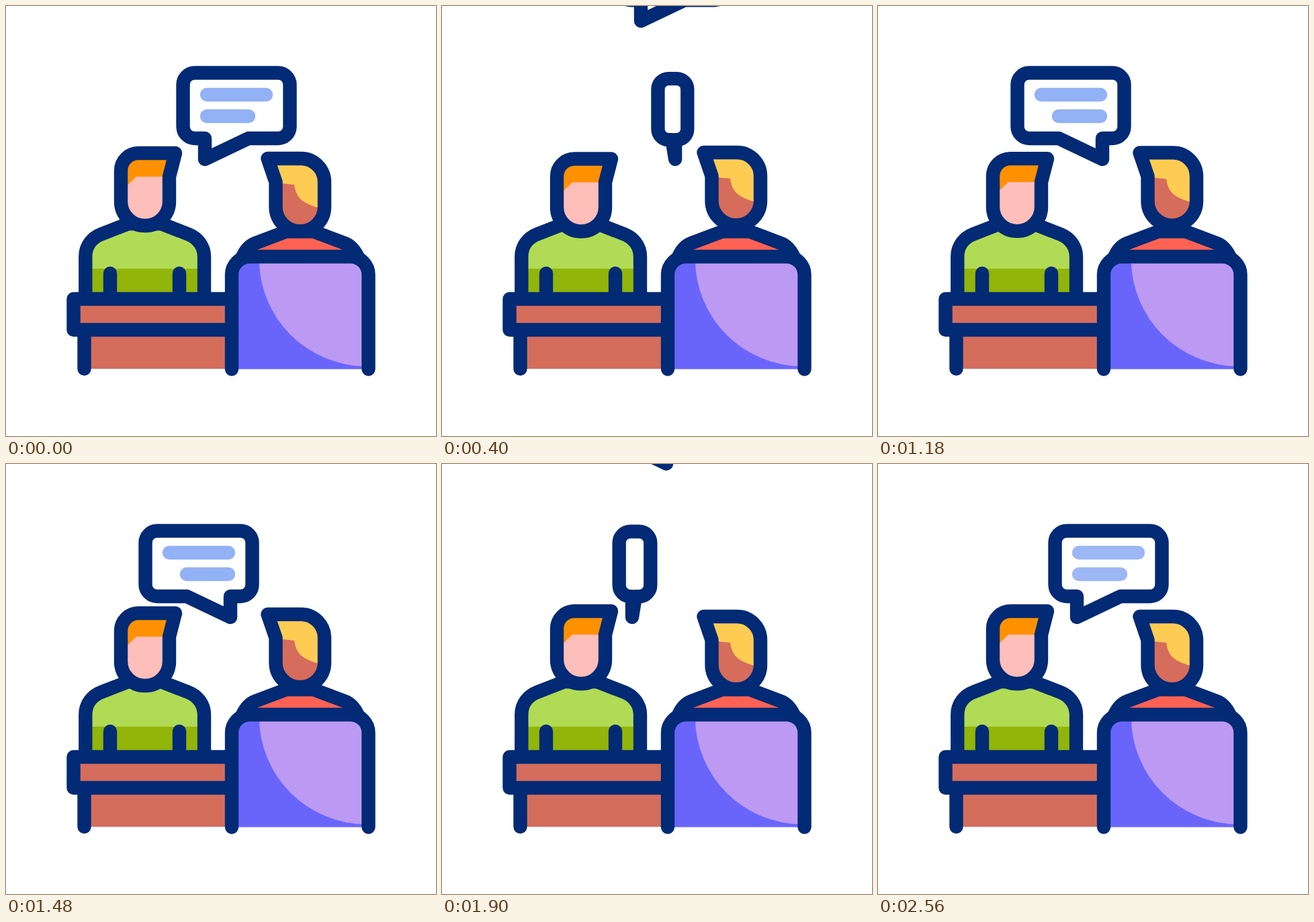
Recreate the animation shown at these times as an HTML page. Size 640 by 640 pixels, loop 3 s.

```html
<!DOCTYPE html>
<html lang="en">
<head>
<meta charset="utf-8">
<title>Interview</title>
<style>
  html, body { margin: 0; width: 100%; height: 100%; overflow: hidden; background: #fff; }
  svg { display: block; width: 100vw; height: 100vh; }
  .line { fill: none; stroke: #022a75; stroke-width: 20.4; stroke-linecap: round; stroke-linejoin: round; }
  .bar { fill: none; stroke: #93b1f5; stroke-width: 20.4; stroke-linecap: round; }
</style>
</head>
<body>
<svg viewBox="0 0 640 640">
  <defs>
    <path id="torsoL" d="M118.300 436V373C118.300 357 128 345 142 339.500L182 324H231L271 339.500C285 345 295 357 295 373V436"/>
    <path id="faceL" d="M252 219L243 254V291A36 36 0 0 1 171 291V245A26 26 0 0 1 197 219Z"/>
    <path id="faceR" d="M389.500 227H439A35 35 0 0 1 474 262V299A36.250 36.250 0 0 1 401.500 299V262Z"/>
    <path id="chair" d="M336 540.500V400A27 27 0 0 1 363 373H512.500A27 27 0 0 1 539.500 400V540.500"/>
    <clipPath id="chairClip"><use href="#chair"/></clipPath>
    <clipPath id="torsoClip"><use href="#torsoL"/></clipPath>
  </defs>

  <use href="#torsoL" fill="#b1db54"/>
  <rect x="110" y="391" width="196" height="46" fill="#91b508" clip-path="url(#torsoClip)"/>
  <use href="#torsoL" class="line"/>
  <path class="line" d="M155 398V436M258 398V436"/>
  <g id="headL">
    <use href="#faceL" fill="#febeb9"/>
    <path fill="#ff9100" d="M252 219L243 254H194L171 276V245A26 26 0 0 1 197 219Z"/>
    <use href="#faceL" class="line"/>
  </g>

  <path fill="#d56d5d" d="M100 436H336V482H100ZM116.500 482H336V540H116.500Z"/>
  <path class="line" d="M336 436H100.500V482H336M116.500 482V540"/>

  <path fill="#ff6253" d="M352 373C357 362 363 356 369.500 353.500L417.500 335.500H457.500L506 353.500C513 356 519 362 524 373Z"/>
  <path class="line" d="M352 373C357 362 363 356 371 353L417.500 335.500H457.500L504 353C512 356 518 362 523.500 373"/>
  <g id="headR">
    <use href="#faceR" fill="#d66c5c"/>
    <path fill="#ffcc53" d="M389.500 227H439A35 35 0 0 1 474 262V303L464 300C438 292 432 284 429 266L402 263Z"/>
    <use href="#faceR" class="line"/>
  </g>

  <use href="#chair" fill="#6a65fa"/>
  <circle cx="536.500" cy="376.500" r="159.700" fill="#bc9af3" clip-path="url(#chairClip)"/>
  <use href="#chair" class="line"/>

  <g id="bubbleR"></g>
  <g id="bubbleL"></g>
</svg>
<script>
const LOOP = 3000;
const LEFT_START = 71, RIGHT_START = 1529;
const EXIT_TIME = 442, EXIT_RISE = 245;
const NOD = 825;

// Bubble outline as key poses: a dot, a narrow column, the full balloon
const DOT  = { l: 282, r: 282, t: 228, b: 228, a: 282, tip: 282, c: 282, rad: 0 };
const SLIM = { l: 263.5, r: 310.5, t: 99.5, b: 197, a: 283, tip: 283, c: 288, rad: 17 };
const FULL = { l: 263.5, r: 422.5, t: 99.5, b: 197, a: 296, tip: 296, c: 361, rad: 17.5 };

const $ = id => document.getElementById(id);
const ease = (t, from, to) => {
  const u = Math.min(1, Math.max(0, (t - from) / (to - from)));
  return u * u * (3 - 2 * u);
};

function mix(p, q, k) {
  const out = {};
  for (const key in p) out[key] = p[key] + (q[key] - p[key]) * k;
  return out;
}

function outline(s) {
  const arc = (x, y) => `A${s.rad} ${s.rad} 0 0 1 ${x} ${y}`;
  return `M${s.l + s.rad} ${s.t}H${s.r - s.rad}${arc(s.r, s.t + s.rad)}V${s.b - s.rad}` +
    `${arc(s.r - s.rad, s.b)}L${s.c} ${s.b}L${s.tip} 228L${s.a} ${s.b}L${s.l + s.rad} ${s.b}` +
    `${arc(s.l, s.b - s.rad)}V${s.t + s.rad}${arc(s.l + s.rad, s.t)}Z`;
}

function makeBubble(id, mirrored) {
  const group = $(id);
  const add = cls => {
    const path = document.createElementNS("http://www.w3.org/2000/svg", "path");
    path.setAttribute("class", cls);
    group.appendChild(path);
    return path;
  };
  const body = add("line"), bars = [add("bar"), add("bar")];
  body.style.fill = "#fff";

  const setBar = (i, y, len, k) => {
    bars[i].setAttribute("d", k > 0 ? `M299 ${y}H${299 + len * k}` : "");
  };

  // age: time since the bubble began to grow; exit: time since it began to leave
  return (age, exit, tint) => {
    const gone = age < 0 || exit >= EXIT_TIME;
    group.style.display = gone ? "none" : "";
    if (gone) return;
    const rise = -EXIT_RISE * ease(exit, 0, EXIT_TIME);
    group.setAttribute("transform", mirrored
      ? `translate(630 ${rise}) scale(-1 1)` : `translate(0 ${rise})`);
    const shape = age < 392
      ? mix(DOT, SLIM, ease(age, 0, 392))
      : mix(SLIM, FULL, ease(age, 392, 670));
    body.setAttribute("d", outline(shape));
    setBar(0, 132, 88, ease(age, 560, 825));
    setBar(1, 164, 62, ease(age, 824, 1030));
    bars.forEach(bar => { bar.style.stroke = tint; });
  };
}

const drawLeft = makeBubble("bubbleL", true);
const drawRight = makeBubble("bubbleR", false);

function render(t) {
  const nod = t < 2 * NOD ? (1 - Math.cos(2 * Math.PI * t / NOD)) / 2 : 0;
  $("headL").setAttribute("transform", `translate(0 ${8.5 * nod})`);
  $("headR").setAttribute("transform", `translate(0 ${-9 * nod})`);

  drawLeft(t - LEFT_START, t - RIGHT_START, "#93b1f5");
  if (t < RIGHT_START) drawRight(LOOP, t - LEFT_START, "#93b1f5");
  else drawRight(t - RIGHT_START, 0, "#9db7f5");
}

const start = performance.now();
function tick() {
  render((performance.now() - start) % LOOP);
  requestAnimationFrame(tick);
}
tick();
</script>
</body>
</html>
```
